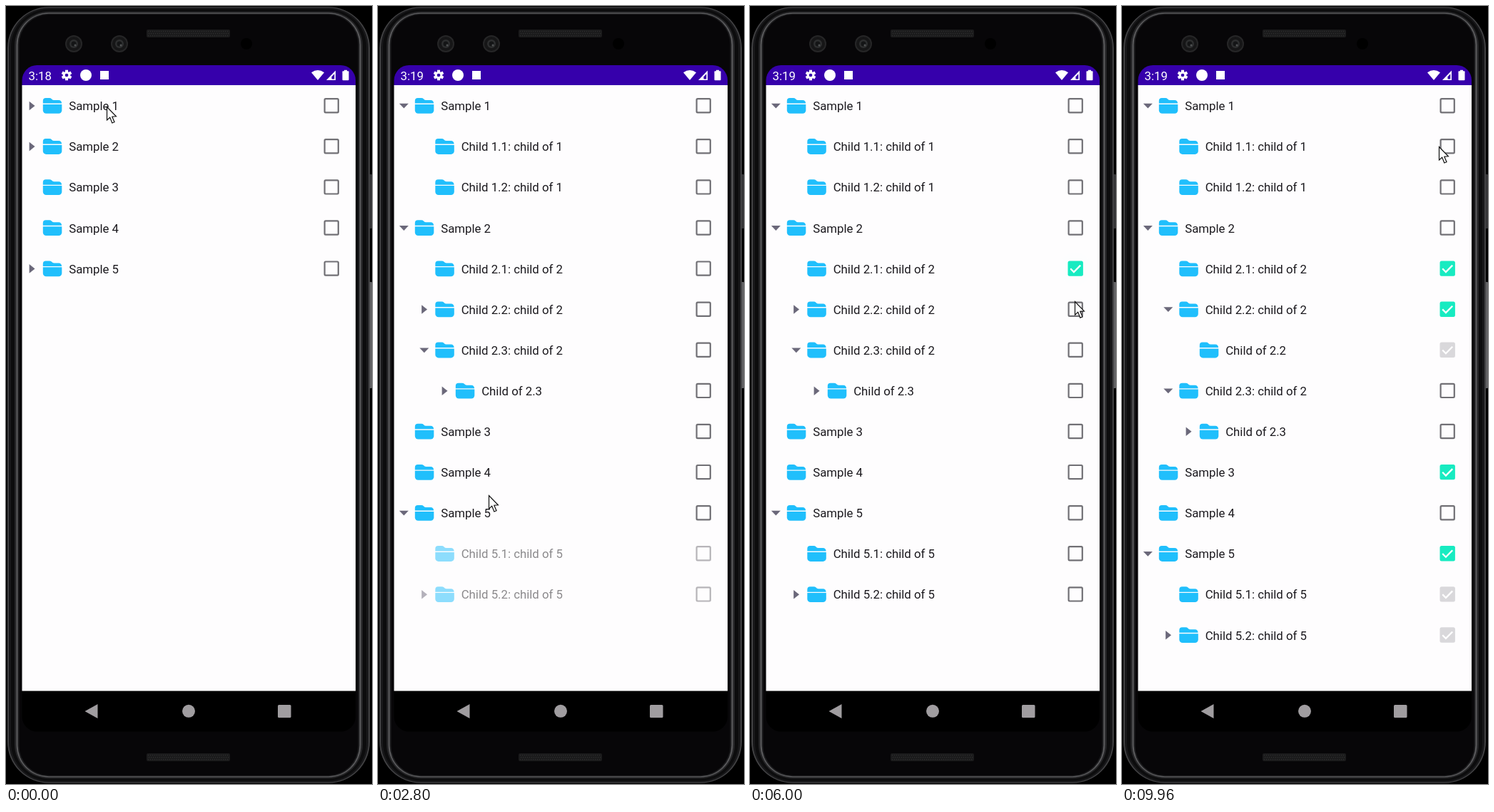
These frames come from a looping animation (513 px wide and 1091 px high, 10000 ms). An HTML page with a canvas:

```html
<!DOCTYPE html>
<html lang="en">
<head>
<meta charset="utf-8">
<title>Folder tree</title>
<style>
html, body { margin: 0; width: 100%; height: 100%; overflow: hidden; background: #000; }
canvas { display: block; width: 513px; height: 1091px; }
</style>
</head>
<body>
<canvas id="stage" width="513" height="1091"></canvas>
<script>
const W = 513, H = 1091, LOOP = 10000, ROW = 57.1, TOP = 140, INDENT = 28.5;
const GREY = '#717075', TEAL = '#17ebc1', PALE = '#d9d8db', PAPER = '#fefdfe', BAR = '#3600ab';
const stage = document.getElementById('stage').getContext('2d');
const clamp = v => Math.max(0, Math.min(1, v));
const smooth = u => u * u * (3 - 2 * u);
const glide = u => (1 - Math.cos(Math.PI * clamp(u))) / 2;

// label, parent row, time the row's children open (Infinity = stays closed)
const rows = [
  ['Sample 1', -1, 300],
  ['Child 1.1: child of 1', 0],
  ['Child 1.2: child of 1', 0],
  ['Sample 2', -1, 1130],
  ['Child 2.1: child of 2', 3],
  ['Child 2.2: child of 2', 3, 7069],
  ['Child of 2.2', 5],
  ['Child 2.3: child of 2', 3, 2130],
  ['Child of 2.3', 7, Infinity],
  ['Sample 3', -1],
  ['Sample 4', -1],
  ['Sample 5', -1, 2740],
  ['Child 5.1: child of 5', 11],
  ['Child 5.2: child of 5', 11, Infinity]
].map(([label, parent, open]) => ({ label, parent, open }));
const LAST_GROUP = 11;

// time, row, checked
const taps = [
  [3680, 3, true], [4710, 3, false], [5560, 4, true],
  [6290, 5, true], [8600, 11, true], [9250, 9, true]
];

// time, x, y of the pointer
const path = [
  [0, 141, 141], [350, 141, 141], [950, 150, 306], [1200, 150, 306],
  [1665, 155, 474], [2150, 155, 474], [2700, 155, 686], [2850, 155, 686],
  [3550, 454, 313], [4880, 454, 313], [5350, 455, 371], [5750, 455, 371],
  [6120, 455, 428], [6450, 455, 428], [6960, 229, 430], [7350, 229, 430],
  [8200, 459, 688], [8270, 459, 688], [8500, 456, 766], [8720, 456, 766],
  [9120, 456, 655], [9360, 456, 655], [9950, 444, 197], [LOOP, 444, 197]
];

// inset and shade of the nested rims of the phone body
const rims = [
  [2, '#424244'], [4, '#18181a'], [7, '#0c0c0d'], [12, '#262628'],
  [14.5, '#5c5c5e'], [16.5, '#1c1c1e'], [18.5, '#070608']
];

function within(i, root) {
  for (; i >= 0; i = rows[i].parent) if (i === root) return true;
  return false;
}

function poly(c, pts, color) {
  c.beginPath();
  pts.forEach(([x, y]) => c.lineTo(x, y));
  c.closePath();
  c.fillStyle = color;
  c.fill();
}

function rounded(c, x, y, w, h, r, color) {
  c.beginPath();
  c.roundRect(x, y, w, h, r);
  c.fillStyle = color;
  c.fill();
}

function disc(c, x, y, r, color) {
  c.beginPath();
  c.arc(x, y, r, 0, 7);
  c.fillStyle = color;
  c.fill();
}

function grille(c, y) {
  rounded(c, 197, y, 117, 11, 2, '#1b1b1c');
  c.fillStyle = '#303031';
  for (let x = 199; x < 313; x += 3)
    for (let k = 0; k < 3; k++) c.fillRect(x + (k % 2), y + 2 + k * 3, 1.2, 1.2);
}

function lens(c, x) {
  disc(c, x, 53, 12, '#262627');
  disc(c, x, 53, 10, '#161617');
  disc(c, x, 53, 6, '#2e2f30');
  disc(c, x, 53, 3.5, '#141516');
  disc(c, x + 2, 55, 1.5, '#505253');
}

function drawPhone(c) {
  c.fillStyle = '#000';
  c.fillRect(0, 0, W, H);
  rounded(c, 509, 236, 4, 76, 1, '#363638');
  rounded(c, 509, 387, 4, 149, 1, '#626264');
  for (const [d, shade] of rims) {
    const dy = d * 0.65;
    rounded(c, d, dy, W - 1 - 2 * d, H - 2 * dy, 60 - d, shade);
  }
  grille(c, 33);
  grille(c, 1048);
  lens(c, 95);
  lens(c, 159);
  disc(c, 337, 53, 8, '#000');

  rounded(c, 22.5, 83, 467.5, 29, [21, 21, 0, 0], BAR);
  rounded(c, 22.5, 960, 467.5, 57.5, [0, 0, 21, 21], '#000');
  c.fillStyle = PAPER;
  c.fillRect(22.5, 111, 467.5, 849.5);

  drawStatus(c);
  poly(c, [[110.5, 989], [128.5, 979], [128.5, 999]], '#a09da0');
  disc(c, 256, 988.8, 9, '#a09da0');
  rounded(c, 381, 980, 18.5, 18, 1.5, '#a09da0');
}

function drawStatus(c) {
  c.save();
  c.translate(85, 97);
  c.fillStyle = '#fff';
  for (let k = 0; k < 6; k++) {
    c.rotate(Math.PI / 3);
    c.fillRect(-2, -7.3, 4, 4);
  }
  disc(c, 0, 0, 5.3, '#fff');
  disc(c, 0, 0, 2.3, BAR);
  c.restore();

  disc(c, 112, 97, 8, '#fff');
  c.fillRect(132, 91, 12, 12);

  c.beginPath();
  c.moveTo(437, 104);
  c.lineTo(428, 93.2);
  c.quadraticCurveTo(437, 86.8, 446, 93.2);
  c.fill();
  poly(c, [[449, 104], [462, 104], [462, 90.5]], '#fff');
  poly(c, [[456.5, 102.4], [460.3, 102.4], [460.3, 95.2], [456.5, 99.2]], BAR);
  rounded(c, 471.5, 91.3, 9, 13, 1, '#fff');
  c.fillRect(474, 89.8, 4, 2);
}

function drawArrow(c, x, y, open) {
  const pts = open
    ? [[x - 6.5, y - 3.2], [x + 6.5, y - 3.2], [x, y + 3.6]]
    : [[x - 3.7, y - 6.3], [x + 4.2, y], [x - 3.7, y + 6.3]];
  poly(c, pts, '#6b687a');
}

function drawFolder(c, x, y) {
  const blue = '#20bffc';
  c.beginPath();
  c.moveTo(x, y - 3.5);
  c.lineTo(x, y - 7);
  c.quadraticCurveTo(x, y - 11, x + 4, y - 11);
  c.lineTo(x + 9, y - 11);
  c.quadraticCurveTo(x + 11, y - 11, x + 12.3, y - 9.6);
  c.quadraticCurveTo(x + 13.6, y - 8, x + 15.5, y - 8);
  c.lineTo(x + 22, y - 8);
  c.quadraticCurveTo(x + 26, y - 8, x + 26.3, y - 3.5);
  c.closePath();
  c.fillStyle = blue;
  c.fill();
  rounded(c, x, y - 2.1, 26.5, 12.9, [0, 0, 4.5, 4.5], blue);
}

function drawBox(c, y, { on, age, locked }) {
  const fill = on ? clamp(age / 170) : 1 - clamp((age - 170) / 170);
  const mark = on ? clamp((age - 170) / 170) : 1 - clamp(age / 120);
  const scale = 1 - 0.1 * Math.max(0, 1 - Math.abs(age - 150) / 150);
  c.save();
  c.translate(456.2, y - 0.3);
  c.scale(scale, scale);
  c.beginPath();
  c.roundRect(-10.7, -10.7, 21.4, 21.4, 2.5);
  if (mark === 0) {
    const hole = Math.max(2, 17 * (1 - fill));
    c.roundRect(-hole / 2, -hole / 2, hole, hole, 0.6);
  }
  c.fillStyle = locked ? PALE : on ? TEAL : GREY;
  c.fill('evenodd');
  if (mark > 0) {
    c.scale(mark, mark);
    c.beginPath();
    c.moveTo(-7, 0.2);
    c.lineTo(-2.3, 4.9);
    c.lineTo(7, -4.5);
    c.strokeStyle = '#fff';
    c.lineWidth = 2.3;
    c.stroke();
  }
  c.restore();
}

function boxState(i, t) {
  let state = { on: false, age: 1e4, locked: false };
  for (const [at, row, on] of taps)
    if (t >= at && within(i, row)) state = { on, age: t - at, locked: on && row !== i };
  return state;
}

function rowY(i, t) {
  let n = 0;
  for (let j = 0; j < i; j++) {
    const p = rows[j].parent;
    n += p < 0 || within(i, p) ? 1 : glide((t - rows[p].open) / 250);
  }
  return TOP + n * ROW;
}

// New rows fade in once the rows below have moved away.
function rowAlpha(i, t) {
  const p = rows[i].parent;
  if (p < 0) return 1;
  const wait = p === LAST_GROUP ? 0 : 250;
  return clamp((t - rows[p].open - wait) / 120);
}

function drawRipple(c, i, y, t) {
  for (const [at, row] of taps) {
    const d = t - at + 100;
    if (row !== i || d < 0 || d > 550) continue;
    c.save();
    c.globalAlpha = Math.min(1, d / 100, (550 - d) / 200);
    disc(c, 456.2, y, 23 * (0.6 + 0.4 * clamp(d / 200)), '#dcf4f4');
    c.restore();
  }
}

function drawRow(c, i, t) {
  const { label, parent, open } = rows[i];
  const alpha = rowAlpha(i, t);
  if (!alpha) return;
  const y = rowY(i, t);
  let depth = 0;
  for (let p = parent; p >= 0; p = rows[p].parent) depth++;
  const dx = depth * INDENT;
  c.globalAlpha = alpha;
  if (open) drawArrow(c, 36.3 + dx, y, t >= open);
  drawFolder(c, 51.8 + dx, y);
  c.fillStyle = '#1b191e';
  c.fillText(label, 88.2 + dx, y + 6.2);
  drawRipple(c, i, y, t);
  drawBox(c, y, boxState(i, t));
  c.globalAlpha = 1;
}

function drawPointer(c, t) {
  let k = 1;
  while (k < path.length - 1 && path[k][0] <= t) k++;
  const [t0, x0, y0] = path[k - 1], [t1, x1, y1] = path[k];
  const u = smooth(clamp((t - t0) / (t1 - t0)));
  c.save();
  c.translate(x0 + (x1 - x0) * u, y0 + (y1 - y0) * u);
  poly(c, [[0.5, 0.5], [0.5, 19], [4.7, 15.2], [7.8, 23], [11, 21.7], [7.8, 14.2], [13.4, 13.8]], '#fff');
  c.strokeStyle = '#111';
  c.lineWidth = 1.2;
  c.stroke();
  c.restore();
}

const phone = document.createElement('canvas');
phone.width = W;
phone.height = H;
drawPhone(phone.getContext('2d'));

function frame() {
  const t = performance.now() % LOOP;
  stage.drawImage(phone, 0, 0);
  stage.font = '16.8px Roboto, sans-serif';
  stage.fillStyle = '#fff';
  stage.fillText(t < 2200 ? '3:18' : '3:19', 31.5, 103.5);
  rows.forEach((_, i) => drawRow(stage, i, t));
  drawPointer(stage, t);
  requestAnimationFrame(frame);
}
frame();
</script>
</body>
</html>
```
